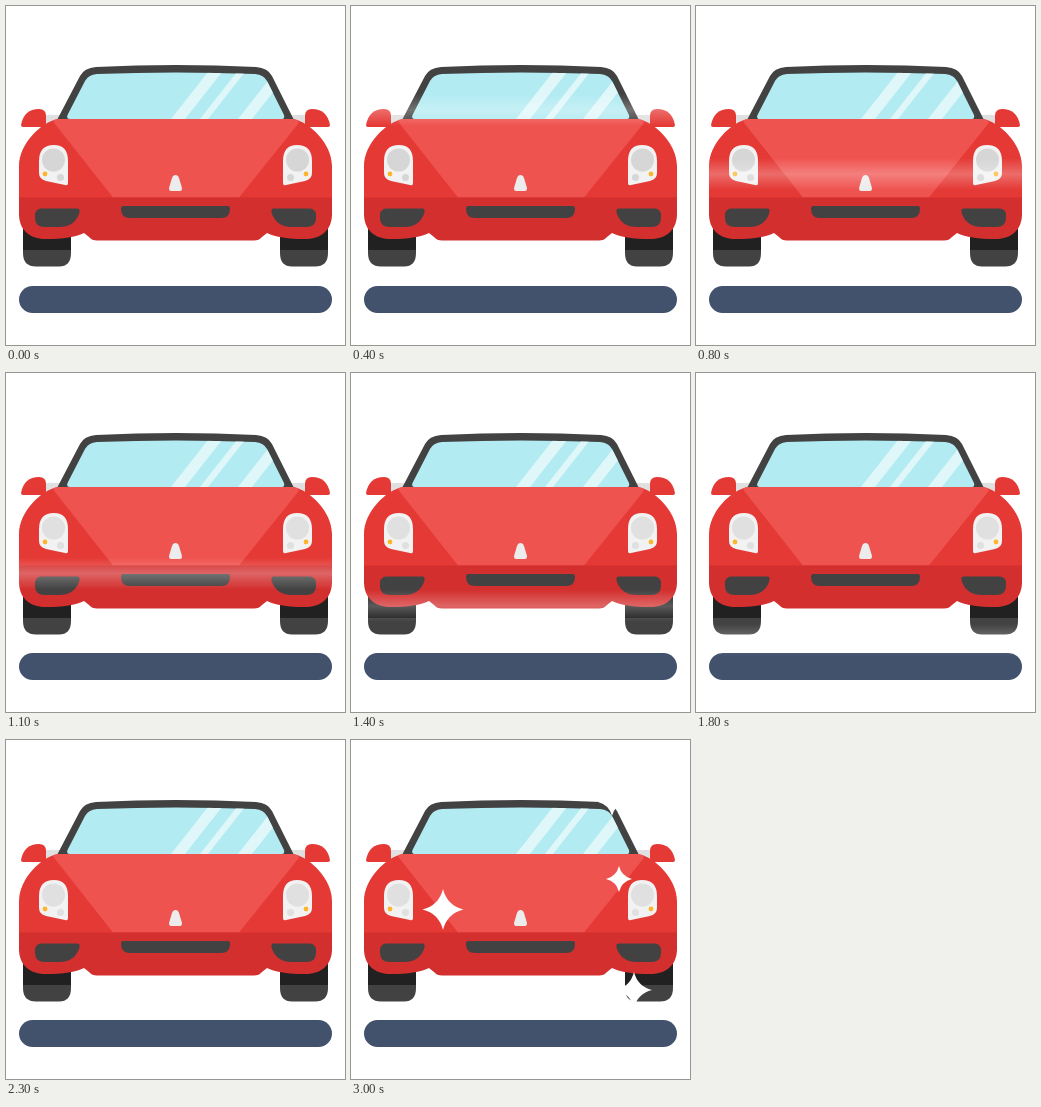
Recreate the animation shown at these times as an HTML page. Size 339 by 339 pixels, loop 3400 ms.

```html
<!DOCTYPE html>
<html lang="en">
<head>
<meta charset="utf-8">
<title>Car shine</title>
<style>
html, body { margin: 0; width: 100%; height: 100%; overflow: hidden; background: #fff; }
svg { display: block; width: 100vw; height: 100vh; }
</style>
</head>
<body>
<svg viewBox="0 0 339 339">
  <defs>
    <linearGradient id="glow" x1="0" y1="0" x2="0" y2="1">
      <stop offset="0" stop-color="#fff" stop-opacity="0"/>
      <stop offset=".5" stop-color="#fff" stop-opacity=".26"/>
      <stop offset="1" stop-color="#fff" stop-opacity="0"/>
    </linearGradient>
    <path id="glass" d="M64 113Q60 113 61.500 109L79 75Q82 69 91 68Q170 65 249 68Q258 69 261 75L278 109Q279 113 276 113Z"/>
    <path id="body" d="M52 113H287C304 116 326 138 326 160V208C326 224 315 233 300 233C281 233 270 231 261 227L256 231Q253 234.500 248 234.500H91Q86 234.500 83 231L78 227C69 231 58 233 39 233C24 233 13 224 13 208V160C13 138 35 116 52 113Z"/>
    <path id="star" d="M0-1Q.2-.2 1 0Q.2 .2 0 1Q-.2 .2-1 0Q-.2-.2 0-1Z"/>
    <clipPath id="inGlass"><use href="#glass"/></clipPath>
    <clipPath id="inBody"><use href="#body"/></clipPath>
    <g id="back">
      <path fill="#e0e0e0" d="M38 109H54L49 119H38Z"/>
      <path fill="#e53935" d="M15 119Q18 103 33 103Q40 103 40 110V119Q40 121 38 121H17Q15 121 15 119Z"/>
      <path fill="#212121" d="M17 220H65V245H17Z"/>
      <path fill="#424242" d="M17 244H65V247Q65 260.500 53 260.500H30Q17 260.500 17 247Z"/>
    </g>
    <g id="front">
      <path fill="#424242" d="M29 208Q30 202.500 36 202.500H71Q75 202.500 73 208Q68 221 53 221H39Q29 221 29 212Z"/>
      <path fill="#f2f2f2" d="M33 155Q33 139 48 139Q62 139 62 155V177Q62 180 59 179L40 175Q33 173 33 167Z"/>
      <circle class="lamp" cx="47.500" cy="154" r="11.500"/>
      <circle class="lamp" cx="54.500" cy="171.500" r="3.500"/>
      <circle cx="39" cy="168" r="2.400" fill="#fbb62d"/>
    </g>
  </defs>
  <rect width="339" height="339" fill="#fff"/>
  <rect x="13" y="280" width="313" height="27" rx="13.500" fill="#42526d"/>
  <g id="car">
    <use href="#back"/>
    <use href="#back" transform="translate(339) scale(-1 1)"/>
    <path fill="#424242" d="M51 114L74 70Q78 62 90 61Q170 57 250 61Q262 62 266 70L288 114Z"/>
    <use href="#glass" fill="#b2ebf2"/>
    <path clip-path="url(#inGlass)" fill="#e0f7fa" d="M165 113L202 66H216L179 113ZM194 113L231 66H239L202 113ZM232 113L269 66H283L246 113Z"/>
    <g clip-path="url(#inBody)">
      <rect x="13" y="110" width="313" height="82" fill="#e53935"/>
      <path fill="#ef5350" d="M45 112H294L292 118L233 191.500H107L49 118Z"/>
      <rect x="13" y="191.500" width="313" height="45" fill="#d32f2f"/>
    </g>
    <use href="#front"/>
    <use href="#front" transform="translate(339) scale(-1 1)"/>
    <path fill="#424242" d="M117 200H222Q224 200 224 203Q224 212 215 212H124Q115 212 115 203Q115 200 117 200Z"/>
    <path fill="#ececec" d="M166 172Q167 169 169.500 169Q172 169 173 172L176 182Q176 185 174 185H165Q163 185 163 182Z"/>
  </g>
  <rect id="band" x="0" width="339" height="32" fill="url(#glow)"/>
  <g id="stars" fill="#fff"></g>
</svg>
<script>
const LOOP = 3400, STEP = 100;
const $ = id => document.getElementById(id);
const car = $('car'), band = $('band');

// time, centre of the light band
const path = [[0, 38], [100, 55], [400, 104], [800, 168], [1400, 233], [1800, 267], [2300, 326]];
// x, y, radius, start, growth time
const stars = [
  [92, 169.5, 20.5, 2400, 400],
  [268, 139, 13, 2500, 400],
  [283, 250, 18, 2600, 400],
  [261, 62, 14, 2600, 400]
].map(([x, y, r, start, span]) => {
  const el = document.createElementNS('http://www.w3.org/2000/svg', 'use');
  el.setAttribute('href', '#star');
  $('stars').append(el);
  return { el, x, y, r, start, span };
});
const lamps = document.querySelectorAll('.lamp');

const clamp = v => Math.max(0, Math.min(1, v));

function bandY(t) {
  const i = path.findIndex(p => p[0] > t);
  if (i < 0) return 400;
  const [t0, y0] = path[i - 1], [t1, y1] = path[i];
  return y0 + (y1 - y0) * (t - t0) / (t1 - t0);
}

function draw(now) {
  const t = Math.floor(now % LOOP / STEP) * STEP;
  const late = t >= 1000;
  car.setAttribute('transform', `translate(0 ${late ? 1 : 0})`);
  lamps.forEach(e => e.setAttribute('fill', late ? '#e0e0e0' : '#d6d6d6'));
  band.setAttribute('y', bandY(t) - 16);
  for (const s of stars) {
    const k = clamp((t - s.start) / s.span);
    s.el.setAttribute('transform', `translate(${s.x} ${s.y}) scale(${s.r * k * (2 - k)})`);
  }
}

const origin = performance.now();
function tick() {
  draw(performance.now() - origin);
  requestAnimationFrame(tick);
}
tick();
</script>
</body>
</html>
```
